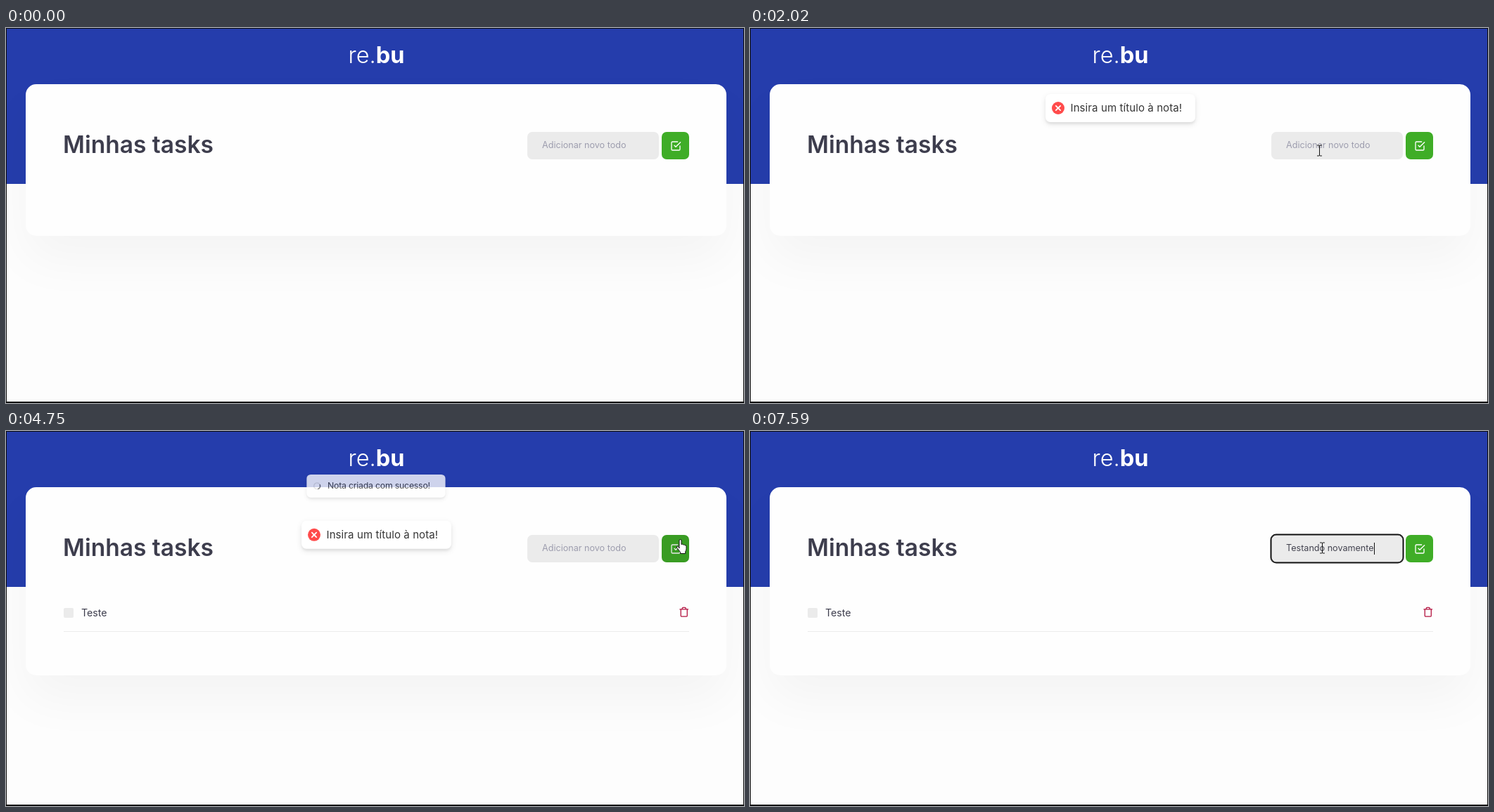
Animation, 1049 px wide and 534 px high, one loop 8 s. Source, as an HTML page:

```html
<!DOCTYPE html>
<html lang="pt">
<head>
<meta charset="utf-8">
<title>Minhas tasks</title>
<style>
html, body { margin: 0; width: 100%; height: 100%; overflow: hidden; }
body { position: relative; background: #fdfdfd; font-family: Inter, "Open Sans", sans-serif; color: #3d3d4d; }
div, svg { position: absolute; left: 0; top: 0; box-sizing: border-box; overflow: visible; white-space: pre; }
svg { fill: none; stroke-linecap: round; stroke-linejoin: round; }
#stage { width: 1049px; height: 534px; overflow: hidden; white-space: normal; }
#header { width: 1049px; height: 222px; background: #253dac; }
#logo { left: 2px; top: 19px; width: 1049px; text-align: center; font-size: 32.5px; line-height: 40px; font-weight: 300; color: #fff; }
#card { left: 28px; top: 80px; width: 996px; border-radius: 15px; background: #fefefe; box-shadow: 0 35px 70px rgba(0, 0, 0, .04); }
#title { left: 81px; top: 146px; font-size: 33.5px; line-height: 41px; font-weight: 600; }
#field { left: 741px; top: 148px; width: 187px; height: 39px; border-radius: 7px; background: #ebebeb; }
#typed { left: 21px; font-size: 12.6px; line-height: 38px; }
#caret { top: 11px; width: 1px; height: 17px; background: #111; }
#button { left: 932px; top: 148px; width: 39px; height: 39px; border-radius: 7px; background: #3fad27; }
#row { left: 82px; top: 238px; width: 889px; height: 48px; border-bottom: 1px solid #ebebeb; }
#box { top: 14px; width: 14px; height: 14px; border-radius: 2px; background: #ebebeb; }
#task { left: 25px; top: 11px; font-size: 14.2px; line-height: 20px; }
.toast { top: 94px; height: 40px; padding-left: 36px; border-radius: 7px; background: #fff; color: #363636;
  font-size: 15px; line-height: 39px; box-shadow: 0 3px 9px rgba(0, 0, 0, .1), 0 3px 3px rgba(0, 0, 0, .05); }
.toast svg { left: 9px; top: 11px; width: 18px; height: 18px; }
#error { left: 419.5px; width: 213.5px; letter-spacing: .1px; }
#success { left: 406px; width: 239.5px; letter-spacing: -.28px; }
#cursor { width: 1px; height: 1px; }
#frame { width: 1049px; height: 534px; border: solid #0c0c0c; border-width: 1px 1px 2px; }
</style>
</head>
<body>
<div id="stage">
  <div id="header"></div>
  <div id="logo">re.<b>bu</b></div>
  <div id="card"></div>
  <div id="title">Minhas tasks</div>
  <div id="field"><div id="typed"><span id="text"></span><div id="caret"></div></div></div>
  <div id="button">
    <svg style="left:11.5px;top:11.5px" width="16" height="16" viewBox="0 0 24 24" stroke="#fff" stroke-width="2"><path d="M9 11l3 3L22 4M21 12v7a2 2 0 0 1-2 2H5a2 2 0 0 1-2-2V5a2 2 0 0 1 2-2h11"/></svg>
  </div>
  <div id="row">
    <div id="box"></div>
    <div id="task">Teste</div>
    <svg style="left:874px;top:12px" width="15.5" height="15.5" viewBox="0 0 24 24" stroke="#b3123f" stroke-width="2"><path d="M3 6H21M19 6v14a2 2 0 0 1-2 2H7a2 2 0 0 1-2-2V6M8 6V4a2 2 0 0 1 2-2h4a2 2 0 0 1 2 2v2"/></svg>
  </div>
  <div id="error" class="toast">Insira um título à nota!</div>
  <div id="success" class="toast">Nota criada com sucesso!</div>
  <svg id="cursor"><path id="pointer"/></svg>
  <div id="frame"></div>
</div>
<script>
const $ = id => document.getElementById(id);
const clamp = v => Math.min(1, Math.max(0, v));
const ramp = (t, start, length) => clamp((t - start) / length);

function bezier(x1, y1, x2, y2) {
  const axis = (a, b, u) => 3 * (1 - u) ** 2 * u * a + 3 * (1 - u) * u * u * b + u ** 3;
  return x => {
    if (x <= 0 || x >= 1) return clamp(x);
    let low = 0, high = 1;
    for (let i = 0; i < 24; i++) {
      const mid = (low + high) / 2;
      if (axis(x1, x2, mid) < x) low = mid; else high = mid;
    }
    return axis(y1, y2, low);
  };
}
const enter = bezier(.21, 1.02, .73, 1);
const leave = bezier(.06, .71, .55, 1);
const pop = bezier(.175, .885, .32, 1.275);
const easeOut = bezier(0, 0, .58, 1);

const LOOP = 8000, CREATED = 4685;
const toasts = [
  { id: 'error', start: 880, end: 4880, color: '#ff4b4b', marks: ['M6.5 6.5L13.5 13.5', 'M13.5 6.5L6.5 13.5'], delays: [150, 180], draw: 150 },
  { id: 'success', start: CREATED, end: 6830, color: '#61d345', marks: ['M6 10.5L9 13.2L14.2 7'], delays: [200], draw: 200 }
];
const inputs = [
  { text: 'Teste', focus: 2520, blur: CREATED, keys: [2990, 3120, 3350, 3540, 3620] },
  { text: 'Testando novamente', focus: 5560, blur: LOOP,
    keys: [5880, 5980, 6080, 6180, 6270, 6370, 6460, 6570, 6800, 6890, 6980, 7080, 7170, 7270, 7380, 7510, 7550, 7590] }
];
const path = [
  [0, 641, 545], [50, 641, 533], [400, 780, 350], [640, 915, 210], [820, 952, 161], [890, 952, 161],
  [1060, 912, 193], [1350, 850, 220], [1690, 800, 186], [2100, 811, 171], [3700, 811, 171],
  [4320, 952, 158], [4500, 958, 154], [4850, 958, 154], [5150, 835, 164], [5330, 813, 166], [LOOP, 813, 166]
];
const pointers = {
  arrow: 'M0 0V15.5L3.7 12.2L6.3 18L8.8 17L6.3 11.3H11Z',
  hand: 'M-1.5 12V1.5a1.5 1.5 0 0 1 3 0V7q1.6-1 2.6.5q1.6-.8 2.3.7q2-.4 2.1 1.4V13q0 2-1.3 4.2V20H0V18L-5 11.5q-.5-1.9 1.2-2.2Z',
  beam: 'M-3-7.5H-1Q0-7.5 0-6.5V6.5Q0 7.5-1 7.5H-3M3-7.5H1Q0-7.5 0-6.5M0 6.5Q0 7.5 1 7.5H3'
};

for (const toast of toasts) {
  const el = toast.el = $(toast.id);
  el.insertAdjacentHTML('beforeend', `<svg viewBox="0 0 20 20">
    <g stroke-width="2"><circle cx="10" cy="10" r="6" stroke="#e0e0e0"/><path d="M14.2 5.8A6 6 0 0 1 14.2 14.2" stroke="#616161"/></g>
    <g><circle cx="10" cy="10" r="10" fill="${toast.color}"/>
    ${toast.marks.map(d => `<path d="${d}" pathLength="1" stroke="#fff" stroke-width="2" stroke-dasharray="1 2"/>`).join('')}</g></svg>`);
  [toast.spinner, toast.badge] = el.querySelectorAll('g');
  toast.lines = toast.badge.querySelectorAll('path');
}

function drawToast(toast, t, push) {
  const age = t - toast.start;
  const p = enter(clamp(age / 350)), q = leave(ramp(t, toast.end, 400));
  const { style } = toast.el;
  style.display = age >= 0 && q < 1 ? '' : 'none';
  style.opacity = (.5 + .5 * p) * (1 - q);
  style.transform = `translateY(${push - 80 * (1 - p) - 60 * q}px) scale(${(.6 + .4 * p) * (1 - .4 * q)})`;
  const size = pop(ramp(age, 100, 300));
  toast.spinner.setAttribute('transform', `rotate(${age * .36} 10 10)`);
  toast.spinner.style.opacity = 1 - clamp(size);
  toast.badge.setAttribute('transform', `translate(10 10) scale(${size}) translate(-10 -10)`);
  toast.badge.style.opacity = clamp(size);
  toast.lines.forEach((line, i) => {
    const drawn = easeOut(ramp(age, toast.delays[i], toast.draw));
    line.style.strokeDashoffset = 1 - drawn;
    line.style.opacity = drawn;
  });
}

function drawField(t) {
  const input = inputs.find(i => t >= i.focus && t < i.blur);
  const keys = input ? input.keys.filter(k => k <= t) : [];
  const last = keys.length ? keys[keys.length - 1] : input && input.focus;
  $('text').textContent = keys.length ? input.text.slice(0, keys.length) : 'Adicionar novo todo';
  $('typed').style.color = keys.length ? '#444450' : '#9d9dae';
  $('field').style.boxShadow = input ? '0 0 0 1.5px #101010, inset 0 0 0 .5px #101010' : 'none';
  const { style } = $('caret');
  style.display = input && (t - last) % 1060 < 530 ? '' : 'none';
  style.left = keys.length ? '100%' : '0';
}

function drawCursor(t) {
  const i = path.findIndex(point => point[0] > t);
  const [a, b] = [path[i - 1], path[i]];
  const k = ramp(t, a[0], b[0] - a[0]);
  const x = a[1] + (b[1] - a[1]) * k, y = a[2] + (b[2] - a[2]) * k;
  const level = y >= 148 && y < 187;
  const kind = level && x >= 932 && x < 971 ? 'hand' : level && x >= 741 && x < 928 ? 'beam' : 'arrow';
  const pointer = $('pointer');
  pointer.setAttribute('d', pointers[kind]);
  pointer.setAttribute('fill', kind === 'beam' ? 'none' : '#fff');
  pointer.setAttribute('stroke', kind === 'arrow' ? '#17173f' : '#111');
  $('cursor').style.transform = `translate(${Math.round(x) + .5}px, ${Math.round(y) + .5}px)`;
}

function render(t) {
  const created = t >= CREATED;
  $('card').style.height = created ? '268px' : '216px';
  $('row').style.display = created ? '' : 'none';
  const hover = ramp(t, 730, 200) - ramp(t, 980, 200) + ramp(t, 4230, 200) - ramp(t, 4910, 200);
  $('button').style.filter = `brightness(${1 - .1 * hover})`;
  drawField(t);
  drawToast(toasts[0], t, 48 * enter(ramp(t, CREATED, 230)));
  drawToast(toasts[1], t, 0);
  drawCursor(t);
}

const began = performance.now();
function tick() {
  render((performance.now() - began) % LOOP);
  requestAnimationFrame(tick);
}
tick();
</script>
</body>
</html>
```
